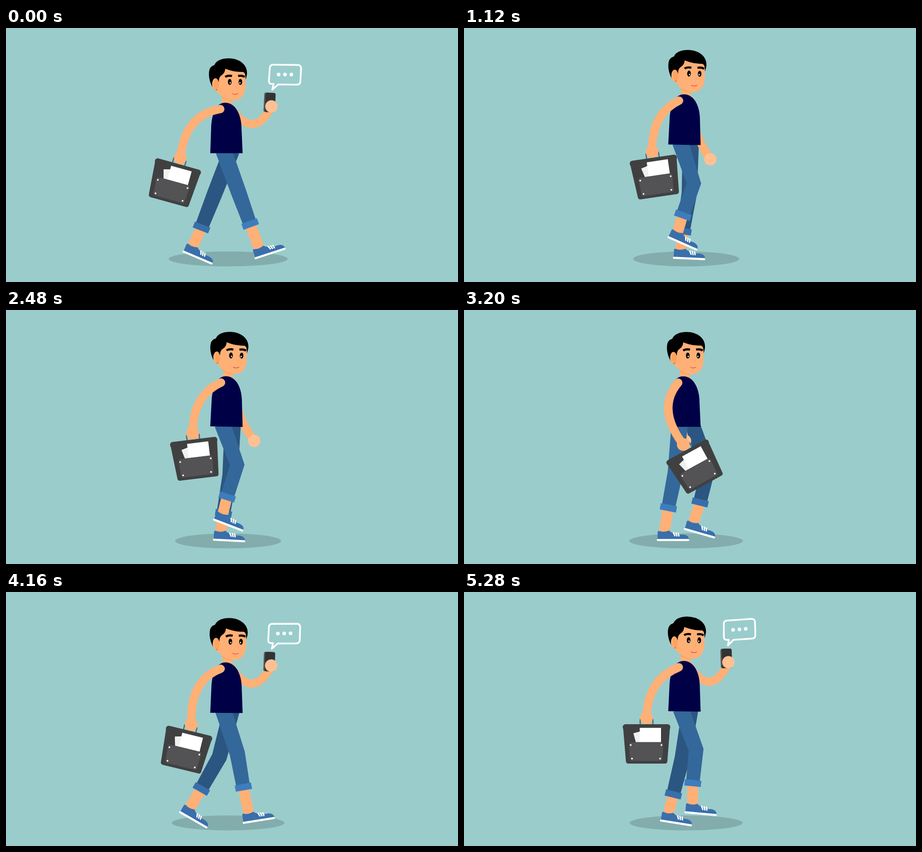
Write an HTML page that moves like this. It is 998 by 561 pixels and loops after 5.36 s.

```html
<!DOCTYPE html>
<html lang="en">
<head>
<meta charset="utf-8">
<title>Walking with a phone</title>
<style>
  html, body { margin: 0; width: 100%; height: 100%; overflow: hidden; background: #9acccc; }
  svg { display: block; width: 100vw; height: 100vh; }
</style>
</head>
<body>
<svg viewBox="0 0 998 561">
  <defs>
    <g id="shoe">
      <path d="M-34 -1V-17Q-34 -20 -31 -20Q-20 -16 -9 -21Q-5 -17 1 -15Q10 -11 22 -12Q34 -11 35 -3V0Z" fill="#3a6fab"/>
      <path d="M1 -16L4 -9.500M6.500 -15.500L8.500 -9M11.500 -15L13 -9" stroke="#fff" stroke-width="3" stroke-linecap="round"/>
      <path d="M-33.500 0H33.500" stroke="#fff" stroke-width="4.600" stroke-linecap="round"/>
    </g>
    <g id="leg">
      <path class="shin" stroke="#ffb076" stroke-width="24"/>
      <use class="foot" href="#shoe"/>
      <path class="pants"/>
      <rect class="cuff" x="-18" y="-7" width="36.500" height="14"/>
    </g>
  </defs>

  <rect width="998" height="561" fill="#9acccc"/>
  <ellipse id="shadow" cx="490.500" cy="510" ry="16.500" fill="#83adac"/>

  <g id="farLeg"></g>

  <path id="farArm" fill="none" stroke="#ffb076" stroke-width="18" stroke-linecap="round"/>
  <g id="phone">
    <g transform="rotate(3)">
      <rect x="-17" y="-30" width="22" height="43" rx="4" fill="#555"/>
      <rect x="-14" y="-30" width="22" height="43" rx="4" fill="#333"/>
    </g>
    <g transform="translate(-586 -172)">
      <path d="M591 122.500H587Q580 122.500 580.500 115L582.500 87Q583 80 590 80L644 80.500Q652 81 651.500 88.500L650 117Q649.500 124 642 124L601 123.500L588 135Z"
        fill="none" stroke="#fff" stroke-width="3.800" stroke-linejoin="round"/>
      <g fill="#fff"><circle cx="602" cy="101.500" r="4"/><circle cx="616" cy="101.500" r="4"/><circle cx="630" cy="101.500" r="4"/></g>
    </g>
  </g>
  <circle id="farHand" r="13.700" fill="#ffc092"/>

  <g id="nearLeg"></g>

  <g id="body">
    <path d="M477 145H498V170H477Z" fill="#ffb076"/>
    <path d="M477 150L498 157V161Q486 159 477 154Z" fill="#ff9f55"/>
    <path d="M466 110L474 92L484 86L529 92V128C529 150 516 160 504 160C489 160 473 152 462 136Z" fill="#ffb076"/>
    <path d="M461 137C450 125 446 105 449 93C451 85 457 83 460 82C465 70 480 67 492 67C512 67 534 79 532 102Q531 109 529 114C529 102 527 97 522 97C505 97 495 94 484 90C483 100 479 102 474 106Q470 110 470 117L466 137Z"/>
    <ellipse cx="462.500" cy="124" rx="7.500" ry="13" fill="#ffb076"/>
    <ellipse cx="464.500" cy="124.500" rx="5.500" ry="11.500" fill="#ffa25b"/>
    <g fill="none" stroke="#000" stroke-width="4.600">
      <path d="M484 108Q490 104 499 106M512.500 106Q521 104 527 108"/>
    </g>
    <ellipse cx="494" cy="119" rx="4" ry="6.600"/><ellipse cx="517.500" cy="119" rx="4" ry="6.600"/>
    <g fill="#fff"><ellipse cx="495" cy="121" rx="1.200" ry="1.900"/><ellipse cx="516.500" cy="121" rx="1.200" ry="1.900"/></g>
    <path d="M510 127Q512 131 508 132" fill="none" stroke="#ffa055" stroke-width="1.200"/>
    <path d="M499 144.500Q506 148.500 512.500 144.500" fill="none" stroke="#e8444f" stroke-width="1.400"/>
    <path d="M451 276.500L453 220C454 195 461 165 484 165C508 165 520 194 520 222L522.500 276.500Z" fill="#000046"/>
  </g>

  <g id="bag">
    <path d="M-14 16V5Q-14 2 -10 2H10Q14 2 14 5V16" fill="none" stroke="#5c6467" stroke-width="2.600"/>
    <path d="M-52 18H52L46 96Q45.500 101 41 101H-40Q-45 101 -45.500 96Z" fill="#404041"/>
    <rect x="-52.500" y="14" width="105" height="13" rx="6" fill="#404041"/>
    <path d="M-29 34L-14 30V56H-23Z" fill="#f0f0f0"/>
    <rect x="-15" y="22" width="47" height="34" fill="#fff"/>
    <path d="M-33 54H32Q37 54 37 59L35 91Q34.500 95 31 95H-32Q-36 95 -36.500 91L-38.500 59Q-38.500 54 -33 54Z" fill="#535356" stroke="#48484a"/>
    <g fill="#fff"><circle cx="-35" cy="60" r="1.900"/><circle cx="33" cy="60" r="1.900"/><circle cx="-32" cy="90" r="1.900"/><circle cx="30" cy="90" r="1.900"/></g>
  </g>
  <path id="nearArm" fill="none" stroke="#ffb076" stroke-width="18.500" stroke-linecap="round"/>
  <circle id="nearHand" r="14" fill="#ffb076"/>
</svg>

<script>
const STEP = 80, STEPS = 67, STRIDE = 16.75;
const BEATS = [0, 1.75, 3.25, 6.5, 8, 10.1, 11.6, 14.25, 15.75];

// One value per beat of the stride.
const torso = {
  bob: [0, -9.5, -6.5, -18.5, -4, -9, -8, -18.8, -12.7],
  lean: [0, .5, 2.4, 0, 0, .5, 1.2, 1, .7],
  shadow: [131.5, 124.5, 110, 125.5, 147.5, 135, 118, 117, 124.5]
};
const nearLeg = {
  cuffX: [539, 524, 501, 451, 408, 404, 410, 488, 505],
  cuffY: [433, 431, 430, 437, 440, 436, 432, 413, 422],
  bend: [0, 6, 14, 5, 0, 12, 22, 27, 19],
  footX: [583, 558, 515.5, 461.5, 409.5, 388, 388, 490.5, 522.5],
  footY: [498, 504.5, 509, 508, 506.5, 507, 505, 475, 489.5],
  footTurn: [-18, -9, 0, 0, 14, 32, 48, 21, 5]
};
const farLeg = {
  cuffX: [431.5, 431, 437, 521, 562, 551, 526, 480, 462],
  cuffY: [440.5, 435, 425, 425, 444, 438, 436, 449, 447],
  bend: [0, 12, 22, 27, 3, 6, 14, 6, 4],
  footX: [423, 413.5, 407.5, 520, 595.5, 582, 543, 492.5, 468],
  footY: [507, 503, 489, 493, 506.5, 508, 509, 509, 510],
  footTurn: [23, 30, 45, 16, -5, -2, 0, 3, 9]
};
const nearArm = {
  elbowX: [395, 406, 447, 424, 437, 437, 438, 413, 405],
  elbowY: [192, 194, 223, 218, 237, 235, 225, 188, 194],
  handX: [385, 409, 454, 484, 510, 505, 475, 412, 403],
  handY: [287, 293, 308, 297, 292, 293, 300, 272, 278],
  bagTurn: [15.5, 13.7, 10.5, -28.8, -36.5, -31, -22, -7, 0]
};
const farArm = {
  elbowX: [535, 530, 508, 470, 412, 430, 480, 510, 528],
  elbowY: [250, 250, 240, 225, 216, 220, 235, 240, 245],
  handX: [580, 560, 524, 488, 484, 486, 505, 548, 572],
  handY: [268, 285, 299, 289, 280, 285, 296, 289, 275]
};
const PHONE_TIMES = [0, 2, 50, 52, 58, 63, 66];
const PHONE_TURNS = [1, 16, 0, 0, 8, 0, -3.5];

// Smooth cyclic curve through the keys, without overshoot.
function curve(keys, values, period, x) {
  const n = keys.length;
  const key = j => keys[(j + n) % n] + period * Math.floor(j / n);
  const value = j => values[(j + n) % n];
  const secant = j => (value(j + 1) - value(j)) / (key(j + 1) - key(j));
  const slope = j => {
    const a = secant(j - 1), b = secant(j);
    return a * b <= 0 ? 0 : 2 * a * b / (a + b);
  };
  let i = n - 1;
  while (keys[i] > x) i--;
  const h = key(i + 1) - key(i), u = (x - key(i)) / h, v = 1 - u;
  return v * v * ((1 + 2 * u) * value(i) + u * h * slope(i))
       + u * u * ((1 + 2 * v) * value(i + 1) - v * h * slope(i + 1));
}

const pose = (tracks, beat) => Object.fromEntries(
  Object.entries(tracks).map(([name, values]) => [name, curve(BEATS, values, STRIDE, beat)]));

const $ = id => document.getElementById(id);
const set = (el, attrs) => { for (const k in attrs) el.setAttribute(k, attrs[k]); };
const mix = (a, b, w) => a + (b - a) * w;
const place = (x, y, turn = 0) => `translate(${x} ${y}) rotate(${turn})`;
const arc = (a, b, c) => `M${a}Q${b} ${c}`;

function normal(a, b) {
  const dx = b[0] - a[0], dy = b[1] - a[1], d = Math.hypot(dx, dy);
  return [dy / d, -dx / d];
}
const offset = (p, n, r) => [p[0] + n[0] * r, p[1] + n[1] * r];

function makeLeg(id, pants, cuff) {
  const group = $(id);
  group.innerHTML = $('leg').innerHTML;
  const part = name => group.querySelector('.' + name);
  set(part('pants'), { fill: pants });
  set(part('cuff'), { fill: cuff });
  return (p, hipX, bob) => {
    const hip = [hipX + .05 * (p.cuffX - 430), 271 + bob];
    const end = [p.cuffX, p.cuffY];
    const middle = [mix(hip[0], end[0], .57), mix(hip[1], end[1], .57)];
    const knee = offset(middle, normal(hip, end), p.bend);
    const upper = normal(hip, knee), lower = normal(knee, end);
    const joint = [(upper[0] + lower[0]) / 2, (upper[1] + lower[1]) / 2];
    const outline = [
      offset(hip, upper, 18), offset(knee, joint, 17), offset(end, lower, 15),
      offset(end, lower, -15), offset(knee, joint, -17), offset(hip, upper, -18)
    ];
    const a = p.footTurn * Math.PI / 180, cos = Math.cos(a), sin = Math.sin(a);
    const ankle = [p.footX - 19.5 * cos + 16 * sin, p.footY - 19.5 * sin - 16 * cos];
    set(part('pants'), { d: 'M' + outline.join('L') + 'Z' });
    set(part('cuff'), { transform: place(...end, Math.atan2(lower[1], lower[0]) * 180 / Math.PI) });
    set(part('shin'), { d: `M${end}L${ankle}` });
    set(part('foot'), { transform: place(p.footX, p.footY, p.footTurn) });
  };
}
const drawFarLeg = makeLeg('farLeg', '#2b5681', '#386fa9');
const drawNearLeg = makeLeg('nearLeg', '#34689a', '#3e7dbd');

// How far the phone arm is lifted out of its swing.
function lift(n) {
  if (n < 7) return 1 - (n / 7) ** 2;
  const u = Math.min(1, Math.max(0, (n - 43) / 7));
  return u * u * (3 - 2 * u);
}

function draw(n) {
  const beat = n % STRIDE;
  const { bob, lean, shadow } = pose(torso, beat);
  const sway = Math.sin(lean * Math.PI / 180) * 97;

  set($('shadow'), { rx: shadow });
  set($('body'), { transform: `translate(0 ${bob}) rotate(${lean} 487 276)` });
  drawFarLeg(pose(farLeg, beat), 498, bob);
  drawNearLeg(pose(nearLeg, beat), 475, bob);

  const near = pose(nearArm, beat);
  const hand = [near.handX, near.handY];
  set($('nearArm'), { d: arc([473 + sway, 179 + bob], [near.elbowX, near.elbowY], hand) });
  set($('nearHand'), { cx: hand[0], cy: hand[1] });
  set($('bag'), { transform: place(...hand, near.bagTurn) });

  const far = pose(farArm, beat), w = lift(n);
  const turn = curve(PHONE_TIMES, PHONE_TURNS, STEPS, n);
  const farHand = [
    mix(far.handX, 585.5 + .5 * turn, w),
    mix(far.handY, 172 + bob + 1.2 * turn, w)
  ];
  const farElbow = [mix(far.elbowX, 547, w), mix(far.elbowY, 250 + bob, w)];
  set($('farArm'), { d: arc([495 + sway, 175 + bob], farElbow, farHand) });
  set($('farHand'), { cx: farHand[0], cy: farHand[1] });
  set($('phone'), {
    transform: place(...farHand, turn - 1),
    visibility: n < 3 || n >= 50 ? 'visible' : 'hidden'
  });
}

const start = performance.now();
function tick() {
  draw(Math.floor((performance.now() - start) / STEP) % STEPS);
  requestAnimationFrame(tick);
}
tick();
</script>
</body>
</html>
```
